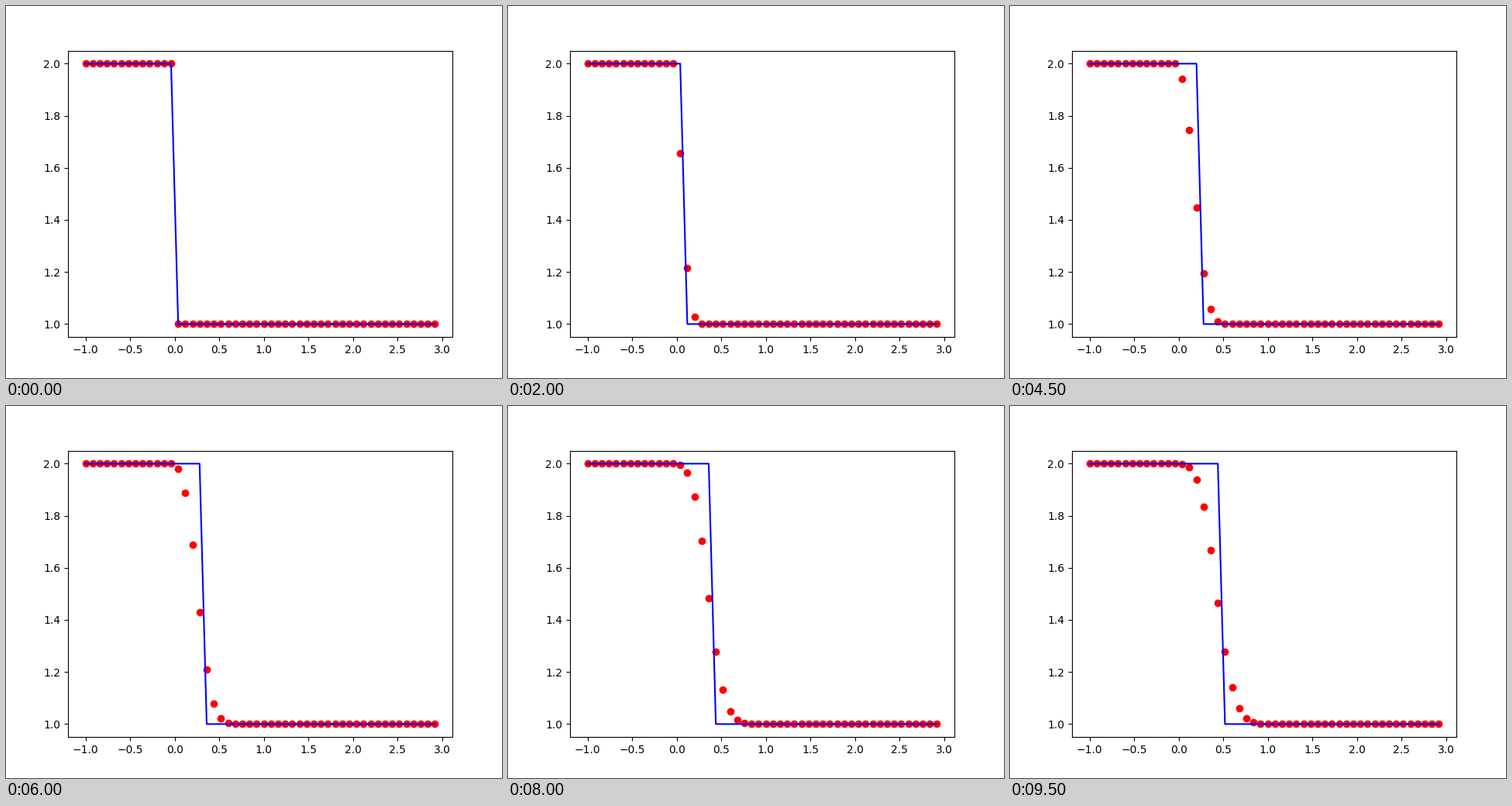
A matplotlib script for the animation above (10000 ms loop, 640 by 480 pixels).

```python
import numpy as np
import matplotlib.pyplot as plt
from matplotlib.animation import FuncAnimation

DX = 0.08
DT = 0.024
CFL = DT / DX
FRAMES = 20

x = -1 + DX * np.arange(50)


def front(t):
    """Exact solution: a step from 2 down to 1 travelling at unit speed."""
    return np.where(x < t - 1e-9, 2.0, 1.0)


def upwind(steps):
    """First-order upwind solution after the given number of steps."""
    u = front(0)
    for _ in range(steps):
        u[1:] -= CFL * np.diff(u)
    return u


fig, ax = plt.subplots(figsize=(6.4, 4.8), dpi=100)
dots, = ax.plot(x, upwind(0), "ro")
line, = ax.plot(x, front(DT), "b-")


def update(frame):
    # The starting state is held for two frames.
    step = max(frame - 1, 0)
    dots.set_ydata(upwind(step))
    line.set_ydata(front(DT * (step + 1)))
    return dots, line


anim = FuncAnimation(fig, update, frames=FRAMES, interval=500,
                     init_func=lambda: update(0), repeat=True, repeat_delay=0)

plt.show()
```
